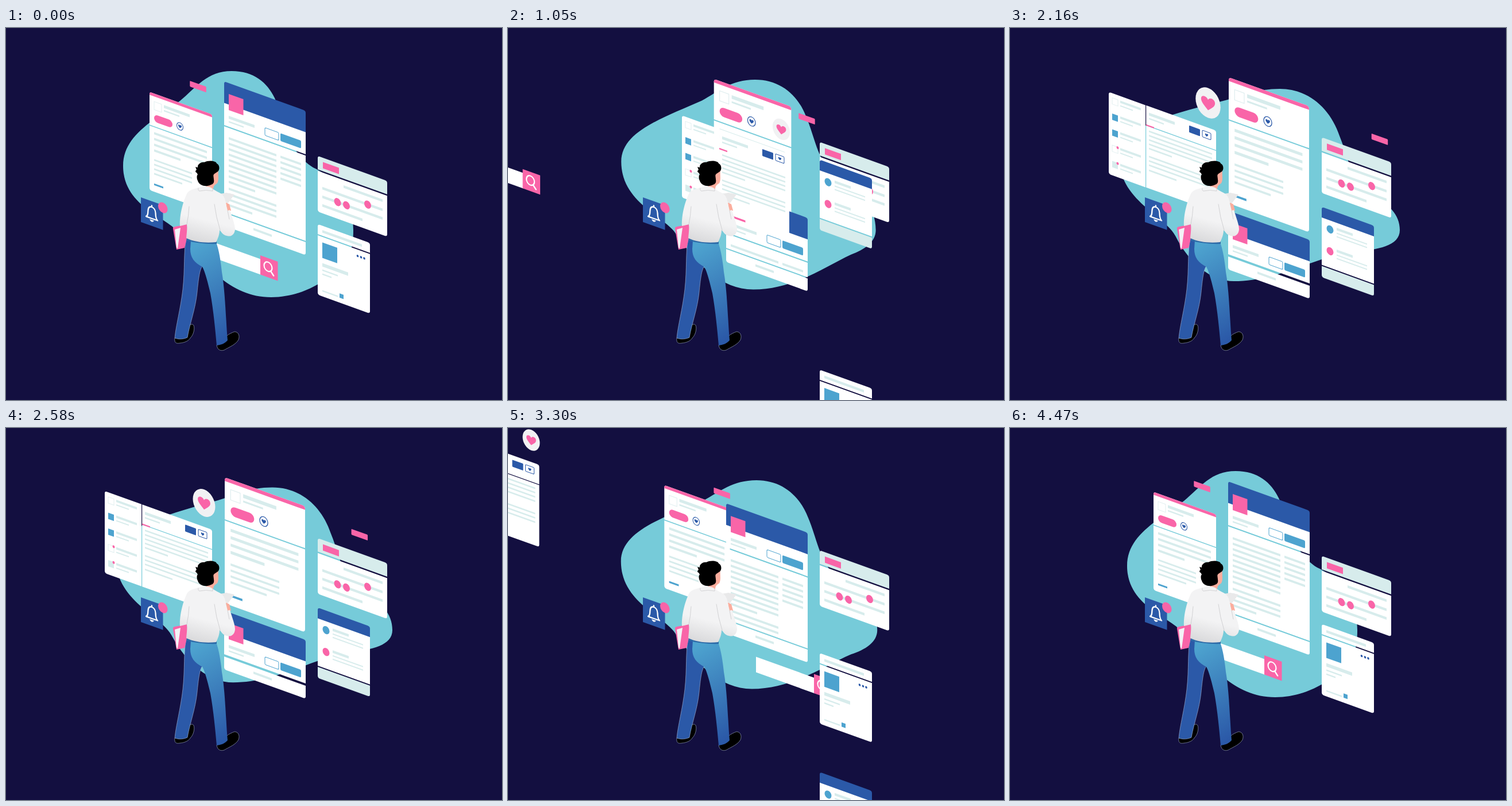
Animation, 864 px wide and 648 px high, one loop 4500 ms. Source, as an HTML page:

```html
<!DOCTYPE html>
<html lang="en">
<head>
<meta charset="utf-8">
<title>Browsing panels</title>
<style>
  html, body { margin: 0; width: 100%; height: 100%; overflow: hidden; background: #130f40; }
  svg { display: block; width: 864px; height: 648px; }
</style>
</head>
<body>
<svg id="stage" viewBox="0 0 864 648" xmlns="http://www.w3.org/2000/svg"></svg>
<script>
const LOOP = 4500, STEP = 30, SLOPE = 0.36;
const BLUE = '#2b59a8', SKY = '#4da3cf', PINK = '#f965a8', PALE = '#d7ecec', WHITE = '#fff';

// Shape helpers, in panel coordinates
const box = (x, y, w, h, fill, r = 0, extra = '') =>
  `<rect x="${x}" y="${y}" width="${w}" height="${h}" rx="${r}" fill="${fill}" ${extra}/>`;
const frame = (x, y, w, h, color, r) => box(x, y, w, h, WHITE, r, `stroke="${color}" stroke-width="1"`);
const dot = (x, y, rx, ry, fill, extra = '') =>
  `<ellipse cx="${x}" cy="${y}" rx="${rx}" ry="${ry}" fill="${fill}" ${extra}/>`;
const path = (d, fill, extra = '') => `<path d="${d}" fill="${fill}" ${extra}/>`;
const line = (d, color, width) =>
  path(d, 'none', `stroke="${color}" stroke-width="${width}" stroke-linecap="round" stroke-linejoin="round"`);
const rows = (x, w, h, ys) => ys.map(y => box(x, y, w, h, PALE)).join('');
const slab = (x, y, w, h, fill, tl = 0, tr = 0, br = 0, bl = 0) => path(
  `M${x + tl} ${y}H${x + w - tr}q${tr} 0 ${tr} ${tr}V${y + h - br}q0 ${br} ${-br} ${br}` +
  `H${x + bl}q${-bl} 0 ${-bl} ${-bl}V${y + tl}q0 ${-tl} ${tl} ${-tl}z`, fill);
const heart = (x, y, s, fill) => path(
  'M0 6C-3 3-6 1-6-2C-6-6-1-6 0-3C1-6 6-6 6-2C6 1 3 3 0 6Z', fill, `transform="translate(${x} ${y}) scale(${s})"`);
const group = (id, body) => `<g id="${id}">${body}</g>`;

const bar = box(-101, 6.5, 102, 27, WHITE) + box(0, 0, 30.5, 33.5, PINK) +
  dot(13.5, 15, 7, 8, 'none', 'stroke="#fff" stroke-width="2.2"') + line('M18.5 21.5L23 27', WHITE, 2.8);

const card = slab(0, 0, 109, 57, WHITE, 4, 4) + slab(0, 0, 109, 5, PINK, 4, 4) +
  slab(0, 58.6, 109, 112.4, WHITE, 0, 0, 4, 4) +
  frame(8, 14, 13, 14, '#e1eff0', 0) + box(25, 14, 45, 5, PALE) + box(25, 22.5, 27, 2.5, PALE) +
  box(8, 36, 32, 13, PINK, 6.5) +
  dot(53, 41, 5.5, 6.4, WHITE, `stroke="${BLUE}" stroke-width="1"`) + heart(53, 41, .5, BLUE) +
  rows(8, 92, 4, [67, 77, 87]) + box(8, 97, 46, 4, PALE) +
  rows(8, 66, 3, [114, 122, 130]) + box(8, 138, 49, 3, PALE) + box(8, 156.5, 16, 3, SKY);

const main = slab(0, 0, 142, 38, BLUE, 4, 4) + box(0, 37.5, 142, 38.5, WHITE) +
  box(8, 19, 25.5, 28, PINK) + box(8, 57, 45, 5, PALE) + box(8, 66, 26, 2.5, PALE) +
  frame(71, 55, 24, 13.5, SKY, 2) + box(98, 55, 36, 13.5, SKY, 2) +
  `<clipPath id="cut"><rect id="cutBox" y="78" width="142" height="149"/></clipPath>
  <g clip-path="url(#cut)">${box(0, 78, 142, 149, WHITE)}
  ${rows(8, 83, 4, [94, 103.5, 113, 122.5, 132, 141.5, 151, 160.5])}${box(8, 170, 46, 4, PALE)}
  ${rows(8, 83, 4, [182, 191.5, 201])}${box(8, 210.5, 41, 4, PALE)}
  ${rows(98, 36, 4, [94, 103.5, 113, 122.5, 132])}</g>` +
  group('foot', slab(0, 0, 142, 22.5, WHITE, 0, 0, 4, 4) + box(51, 8, 32, 4, PALE));

const chart = slab(0, 0, 121, 23.5, PALE, 4, 4) + slab(0, 26, 121, 71, WHITE, 0, 0, 4, 4) +
  box(9, 7.5, 28, 11, PINK) + box(45, 35, 68, 4.5, PALE) + rows(8, 105, 4.5, [51, 66]) + box(8, 81, 70, 4.5, PALE) +
  dot(34.5, 68, 6, 6.8, PINK) + dot(50, 68, 6, 6.8, PINK) + dot(87, 53.5, 6, 6.8, PINK);

const profile = slab(0, 0, 91, 17.5, WHITE, 4, 4) + slab(0, 19.5, 91, 103.5, WHITE, 0, 0, 4, 4) +
  box(8, 7.5, 69, 4.5, PALE) + box(8, 29, 26, 27, SKY) +
  [69.5, 75.5, 81].map(x => dot(x, 30.5, 1.8, 2, BLUE)).join('') +
  box(8, 65, 45, 6, PALE) + box(8, 76, 27, 2.5, PALE) + box(8, 83, 16, 2.5, PALE) +
  box(8, 112, 27, 2.5, PALE) + box(38, 107, 7, 7.5, SKY);

const contact = (y, color) => dot(14.5, y, 6, 6.8, color) + box(26, y - 7, 28, 4.5, PALE) +
  box(26, y + 1.5, 53, 2, PALE) + box(26, y + 7.5, 53, 2, PALE);
const contacts = box(0, 17, 91, 84, WHITE) + slab(0, 0, 91, 18.5, BLUE, 4, 4) +
  contact(34, SKY) + contact(72, PINK) + slab(0, 103, 91, 19.5, PALE, 0, 0, 4, 4);

const listRow = i => {
  const y = 8 + i * 27.5;
  const icon = i == 1 || i == 2 ? box(6, y, 10, 11, SKY) : i == 4 ? box(6, y, 10, 11, PALE) : frame(6, y, 10, 11, '#e1eff0', 0);
  return icon + (i > 2 ? dot(15.5, y + 1, 2, 2.3, PINK) : '') + box(20, y, 36, 4, PALE) + box(20, y + 8, 22, 2, PALE);
};
const mail = slab(0, 0, 64, 143, WHITE, 4, 0, 0, 4) + [0, 1, 2, 3, 4].map(listRow).join('') +
  slab(65.2, 0, 121.8, 34, WHITE, 0, 4) + slab(65.2, 35.3, 121.8, 107.7, WHITE, 0, 0, 4) +
  box(70, 11, 45, 5, PALE) + box(70, 20, 26, 2.5, PALE) + box(65, 33, 14, 2.3, PINK) +
  box(140, 8, 19, 12, BLUE, 1) + frame(163, 8, 15, 11.5, BLUE, 1.5) + heart(170.5, 13.8, .45, BLUE) +
  rows(70, 110, 2.8, [42, 49.5, 57, 64.5, 86, 93.5, 101]) + box(70, 72, 40, 2.8, PALE) + box(70, 110, 48, 2.8, PALE);

const bell = box(0, 0, 38.5, 43, BLUE) +
  line('M9 30C13 27 12 22 12.5 18C13 12 16 10 19 10C22 10 25 12 25.5 18C26 22 25 27 29 30ZM19 7.5V10', WHITE, 2.3) +
  path('M15 32.5Q19 39 23 32.5Z', WHITE) + dot(38.3, 4.3, 8.3, 9, PINK);

const grad = (id, x2, a, b) => `<linearGradient id="${id}" x1="0" y1="0" x2="${x2}" y2="1">` +
  `<stop offset=".45" stop-color="${a}"/><stop offset="1" stop-color="${b}"/></linearGradient>`;
const edge = 'stroke="#bccce4" stroke-opacity=".65" stroke-width=".8"';
const man = `<defs>${grad('cloth', -.25, '#f3f3f4', '#d0d0d2')}
  <linearGradient id="denim" x1=".4" y1="0" x2=".6" y2="1"><stop stop-color="${SKY}"/><stop offset="1" stop-color="${BLUE}"/></linearGradient></defs>` +
  // shoes
  path('M294 540C293 548 296 550 302 549C312 548 318 545 321 540C327 534 329 524 327 518C324 514 319 517 319 520L315 539Z', '#000', edge) +
  path('M367 552C368 561 374 563 380 561C388 556 400 552 405 543C408 535 404 529 398 529C393 531 388 533 385 536Z', '#000', edge) +
  // trousers
  path('M314 366C309 390 312 420 308 455C304 490 296 518 294 540C301 543 310 542 316 539C320 515 330 490 333 460C335 440 337 421 342 415L350 373Z', BLUE, edge) +
  path('M322 370L366 373C371 387 374 405 376 425C382 460 383 510 386 544C381 550 374 552 367 553C364 520 361 490 356 462C352 445 347 425 342 416C328 409 321 400 321 385Z', 'url(#denim)') +
  path('M314 366Q338 373 367 372L367 376Q340 377 313 370Z', '#2d6ba8') +
  // book
  path('M291 350Q290 347 294 346L315 342C318 355 314 372 311 383L297 386Z', PINK) +
  path('M294 351L304 348L299 384L297 383Z', '#f3f3f6') +
  // head
  path('M357 250L370 248C369 255 371 262 369 268C368 273 362 271 361 280L348 280L350 268Z', '#fbad9d') +
  path('M332 252C329 251 330 248 332 247L330 242L334 243C333 237 341 233 345 234C352 230 366 231 367 236C372 238 373 246 369 250L363 254C360 256 362 260 362 264C363 269 361 272 357 273C351 277 337 276 334 266C332 262 332 257 334 255Z', '#000') +
  // paper, hand
  path('M372 289L384 287L398 290L386 306L379 300Z', '#e9e9ea') +
  path('M383 304L389 307L392 318L385 319Z', '#fbad9d') +
  // shirt
  path('M335 278C345 275 354 275 360 280C367 286 378 287 381 297L386 318L390 317C395 333 399 343 399 351C398 361 391 364 385 362C378 361 376 356 372 352C372 360 369 367 366 373C348 375 328 373 314 366C315 356 316 348 315 342L303 345C302 325 309 300 316 287C321 281 329 280 335 278Z', 'url(#cloth)') +
  line('M335 279Q334 283 337 284Q349 281 360 284L360 280M363 307Q366 330 373 352M386 318L389 333M319 311Q318 328 315 342', '#c9c9cc', .8);

const skewed = (x, y, s = 1) => `matrix(${s} ${SLOPE * s} 0 ${s} ${x} ${y})`;
document.getElementById('stage').innerHTML =
  box(0, 0, 864, 648, '#130f40') + '<path id="blob" fill="#76cbd9"/>' +
  group('bar', bar) + group('card', card) + group('main', main) + group('chart', chart) +
  group('profile', profile) + group('contacts', contacts) + group('mail', mail) +
  group('badge', dot(0, 0, 15, 18, '#f1f1f3') + heart(0, .5, 1.4, PINK)) +
  group('tag', box(0, 0, 28.5, 10, PINK, 1.2)) +
  `<g transform="${skewed(235, 295)}">${bell}</g>` + man;

// Both ends of the blob morph: start point, then cubic segments
const points = s => s.split(' ').map(Number);
const blobA = points('204 240 204 190 250 165 303 127 332 103 350 75 393 75 432 75 455 95 468 122 485 160 490 215 535 243 575 262 605 300 605 352 605 366 604 386 595 399 575 430 525 469 462 469 390 469 345 412 290 346 258 322 204 300 204 240');
const blobB = points('190 225 190 170 290 148 375 126 405 118 430 106 470 106 520 106 558 140 574 188 592 232 592 262 625 290 660 305 679 325 679 352 679 380 640 386 600 390 535 396 470 441 390 441 350 441 312 410 288 362 268 325 190 300 190 225');

const parts = {};
for (const el of document.querySelectorAll('#stage [id]')) parts[el.id] = el;
const place = (id, x, y, s) => parts[id].setAttribute('transform', skewed(x, y, s));

// Exponential ease in and out, 900 ms long, centred on mid
function swap(t, mid) {
  const u = (t - mid) / 900 + .5;
  if (u <= 0) return 0;
  if (u >= 1) return 1;
  return u < .5 ? 2 ** (20 * u - 10) / 2 : 1 - 2 ** (10 - 20 * u) / 2;
}
// Smooth swell around a moment
const swell = d => Math.abs(d) < 820 ? Math.cos(Math.PI * d / 1640) ** 2 : 0;

function draw(t) {
  const go = swap(t, 980), back = swap(t, 3230), p = go - back;
  const rest = swell((t + LOOP / 2) % LOOP - LOOP / 2), hold = swell(t - LOOP / 2);

  const peak = 2150;
  const u = t < peak ? t / peak : (LOOP - t) / (LOOP - peak);
  const q = (1 - Math.cos(Math.PI * u)) / 2;
  const b = blobA.map((a, i) => (a + (blobB[i] - a) * q).toFixed(2));
  parts.blob.setAttribute('d', `M${b.slice(0, 2).join(' ')}C${b.slice(2).join(' ')}Z`);

  const barX = t < LOOP / 2 ? -503 * go : 529 * (1 - back);
  place('bar', 443 + barX, 396 + barX * SLOPE);

  const body = 149 * (1 - p);
  place('card', 250 + 131 * p, 102.3 - 16.5 * p + 9 * rest, 1 + .284 * p);
  place('main', 380, 93 + 225 * p);
  parts.cutBox.setAttribute('height', body);
  parts.foot.setAttribute('transform', `translate(0 ${80 + body})`);

  place('chart', 543, 216.8 - 22 * p + 6 * rest - 4.5 * hold);
  place('profile', 543, 339.6 + 308 * p + 2 * rest);
  place('contacts', 543, 315.5 - 506 * (1 - go) + 342 * back - 4 * hold);

  const mx = 172 + 770 * (1 - go) - 367 * back;
  const my = 106.5 + 270 * (1 - go) - 132 * back;
  place('mail', mx, my + 5 * hold);
  place('badge', mx + 173, my + 24, 1 + .46 * hold);
  place('tag', 320.3 + 224 * p + 88 * hold, 92 + 67.5 * p + 25 * hold);
}

// The picture advances in even steps; the small lead absorbs timer rounding
function tick() {
  draw(Math.floor((performance.now() + 4) / STEP) * STEP % LOOP);
  requestAnimationFrame(tick);
}
tick();
</script>
</body>
</html>
```
